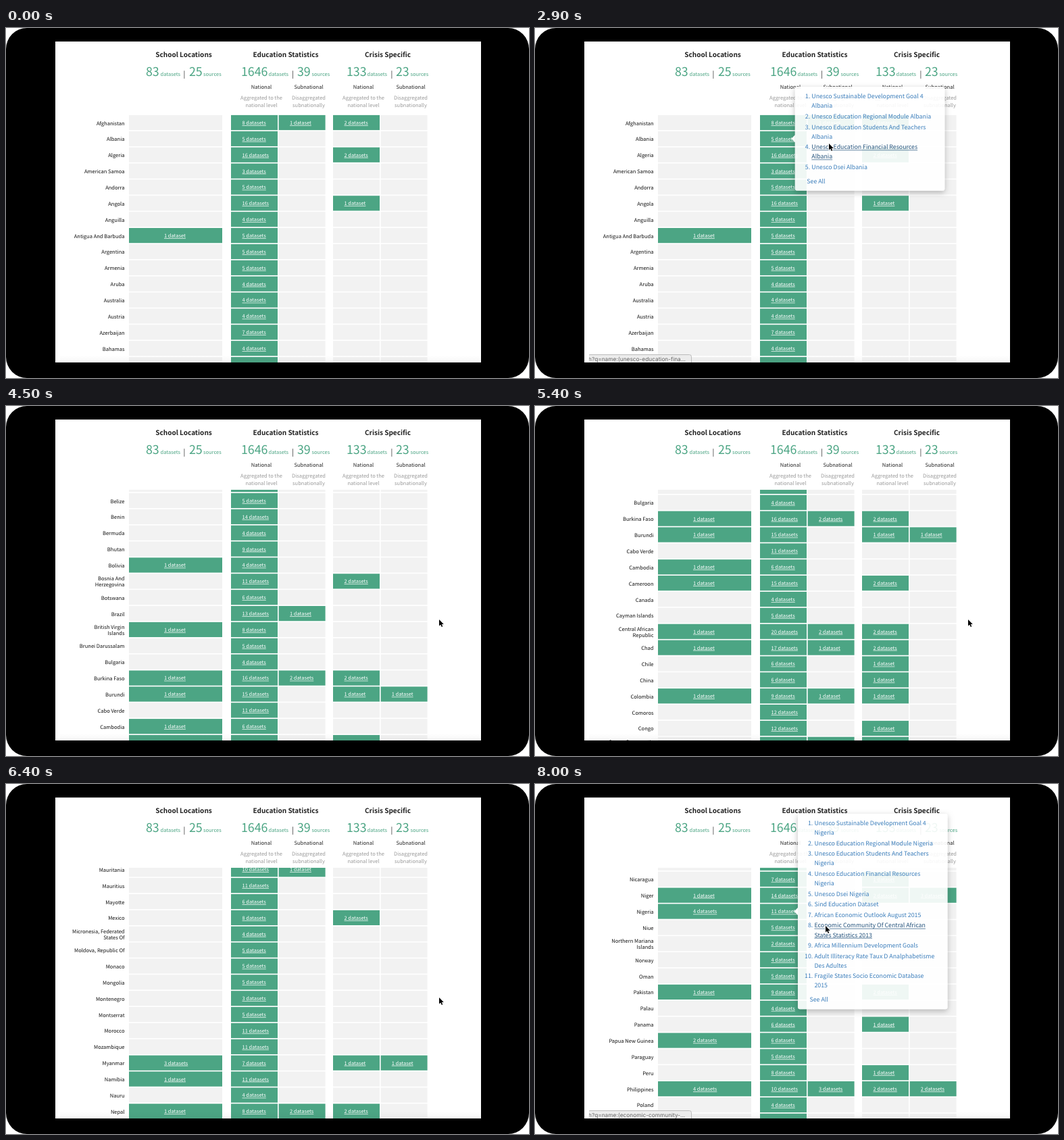
Recreate the animation shown at these times as an HTML page with a canvas. Size 774 by 518 pixels, loop 8.5 s.

```html
<!DOCTYPE html>
<html lang="en">
<head>
<meta charset="utf-8">
<title>Education datasets by country</title>
<style>
html, body { margin: 0; width: 774px; height: 518px; overflow: hidden; background: #fff; }
canvas { display: block; }
</style>
</head>
<body>
<canvas id="stage" width="774" height="518"></canvas>
<script>
const ctx = document.getElementById('stage').getContext('2d');
const SANS = '"Noto Sans CJK JP", "Noto Sans CJK SC", "Noto Sans CJK KR", "Noto Sans CJK TC", "Noto Sans CJK", "Source Sans Pro", "Open Sans", sans-serif';
const UI = 'Inter, Roboto, sans-serif';
const GREEN = '#4ca584', LINK = '#3a7dbb', LINK_HOVER = '#23527c';
const LOOP = 8500, PITCH = 23.87, FIRST = 140;

// l: locations, n/s: statistics (national, subnational), c/d: crisis (national, subnational)
const COLS = {
  l: { x: 182, w: 138, text: 234 },
  n: { x: 333, w: 69, text: 349.5 },
  s: { x: 403.6, w: 69, text: 420 },
  c: { x: 484, w: 69, text: 500.5 },
  d: { x: 554.6, w: 69, text: 570.7 }
};

const COUNTRIES = (
  'Afghanistan:n8s1c2;Albania:n5;Algeria:n16c2;American Samoa:n3;Andorra:n5;Angola:n16c1;Anguilla:n4;' +
  'Antigua And Barbuda:l1n5;Argentina:n5;Armenia:n5;Aruba:n4;Australia:n4;Austria:n4;Azerbaijan:n7;' +
  'Bahamas:n4;Bahrain:n5;Bangladesh:l6n8s6c2d1;Barbados:l1n5;Belarus:n5;Belgium:n4;Belize:n5;Benin:n14;' +
  'Bermuda:n4;Bhutan;Bolivia;Bosnia And/Herzegovina;Botswana;Brazil;British Virgin/Islands;' +
  'Brunei Darussalam:n5;Bulgaria:n4;Burkina Faso:l1n16s2c2;Burundi:l1n15c1d1;Cabo Verde:n11;' +
  'Cambodia:l1n6;Cameroon:l1n15c2;Canada:n4;Cayman Islands:n5;Central African/Republic:l1n20s2c2;' +
  'Chad:l1n17s1c2;Chile:n6c1;China:n6c1;Colombia:l1n9s1c1;Comoros:n12;Congo:n12c1;' +
  'Congo, Democratic/Republic Of;Cook Islands;Costa Rica;Côte D\'Ivoire;Croatia;Cuba;Curaçao;Cyprus;' +
  'Czech Republic;Denmark;Djibouti;Dominica;Dominican/Republic;Ecuador;Egypt;El Salvador;' +
  'Equatorial Guinea;Eritrea;Estonia;Ethiopia;Fiji;Finland;France;French Polynesia;Gabon;Gambia;' +
  'Georgia;Germany;Ghana;Gibraltar;Greece;Grenada;Guam;Guatemala;Guinea;Guinea-Bissau;Guyana;Haiti;' +
  'Honduras;Hong Kong;Hungary;Iceland;India;Indonesia;Iran;Iraq;Ireland;Israel;Italy;Jamaica;Japan;' +
  'Jordan;Kazakhstan;Kenya;Kiribati;Kuwait;Kyrgyzstan;Latvia;Lebanon;Lesotho;Liberia;Libya;' +
  'Liechtenstein;Lithuania;Luxembourg;Macao;Madagascar;Malawi;Malaysia;Maldives;Mali;Malta;' +
  'Marshall Islands;Mauritania:n10s1;Mauritius:n11;Mayotte:n6;Mexico:n8c2;' +
  'Micronesia, Federated/States Of:n4;Moldova, Republic Of:n5;Monaco:n5;Mongolia:n5;Montenegro:n3;' +
  'Montserrat:n5;Morocco:n11;Mozambique:n11;Myanmar:l3n7c1d1;Namibia:l1n11;Nauru:n4;Nepal:l1n8s2c2;' +
  'Netherlands;New Caledonia;New Zealand:n4;Nicaragua:n7c1;Niger:l1n14c2d3;Nigeria:l4n11;Niue:n5;' +
  'Northern Mariana/Islands:n2;Norway:n4;Oman:n5;Pakistan:l1n9c2;Palau:n4;Panama:n6c1;' +
  'Papua New Guinea:l2n6;Paraguay:n5;Peru:n8c1;Philippines:l4n10s3c2d2;Poland:n4;Portugal:n5;Qatar'
).split(';').map(parseRow);

function parseRow(entry, i) {
  const [name, code] = entry.split(':');
  const cells = {};
  if (code) {
    for (const [, key, n] of code.matchAll(/([a-z])(\d+)/g)) cells[key] = +n;
  } else {
    cells.n = 4 + i * 7 % 12;
    if (i % 4 === 0) cells.l = 1;
    if (i % 5 === 0) cells.c = 1 + i % 2;
    if (i % 9 === 0) cells.s = 1;
  }
  return { lines: name.split('/'), cells };
}

const rowOf = name => COUNTRIES.findIndex(r => r.lines[0] === name);

const unesco = place => [
  ['Unesco Sustainable Development Goal 4', place],
  place === 'Afghanistan' ? ['Unesco Education Regional Module', place]
    : ['Unesco Education Regional Module ' + place],
  ['Unesco Education Students And Teachers', place],
  ['Unesco Education Financial Resources', place],
  ['Unesco Dsei ' + place]
];

const LISTS = {
  Afghanistan: [...unesco('Afghanistan'), ['Education Indicators 2013'], ['School Enrolment By District'],
    ['Literacy Rate By Province']],
  Albania: unesco('Albania'),
  Nigeria: [...unesco('Nigeria'), ['Sind Education Dataset'], ['African Economic Outlook August 2015'],
    ['Economic Community Of Central African', 'States Statistics 2013'], ['Africa Millennium Development Goals'],
    ['Adult Illiteracy Rate Taux D Analphabetisme', 'Des Adultes'],
    ['Fragile States Socio Economic Database', '2015']]
};

// [time, rows scrolled]
const SCROLL = [[3400, 0], [3900, 6.745], [4500, 20], [5000, 23], [5400, rowOf('Bulgaria') - 0.117],
  [6400, rowOf('Mauritania') + 0.574], [6600, rowOf('Nicaragua') - 0.034]];
// [time, x, y]
const POINTER = [[200, 366, 141], [400, 366, 141], [900, 365, 163], [1400, 428, 103], [1900, 432, 129],
  [2400, 434, 146], [2900, 435, 171], [3400, 664, 270], [3900, 668, 289], [4500, 641, 316],
  [6600, 641, 316], [6800, 368, 187], [7000, 420, 176], [7500, 428, 191], [8000, 430, 210]];
const POPUPS = [[200, 'Afghanistan'], [900, 'Albania'], [3400, null], [6800, 'Nigeria']];
const HOVERS = [[1400, 0], [1900, 1], [2400, 2], [2900, 3], [3400, null], [7000, 5], [7500, 6], [8000, 7]];
// [start, length of each step]
const STEPS = [[0, 200], [400, 500], [3900, 200], [4500, 500], [5000, 200], [7000, 500]];

const latest = (keys, t) => keys.filter(k => k[0] <= t).pop() || [0, null];

function snap(t) {
  const [start, size] = latest(STEPS, t);
  return start + Math.floor((t - start) / size) * size;
}

function tween(keys, t, col) {
  const a = latest(keys, t), b = keys.find(k => k[0] > t);
  if (a[1] === null) return b[col];
  if (!b) return a[col];
  return a[col] + (b[col] - a[col]) * (t - a[0]) / (b[0] - a[0]);
}

function font(size, weight = 400, family = SANS) {
  ctx.font = `${weight} ${size}px ${family}`;
}

function write(str, x, y, color, align = 'left') {
  ctx.fillStyle = color;
  ctx.textAlign = align;
  ctx.fillText(str, x, y);
}

function underline(str, x, y, color) {
  ctx.fillStyle = color;
  ctx.fillRect(x, y, ctx.measureText(str).width, 0.7);
}

function box(x, y, w, h, r) {
  ctx.beginPath();
  ctx.roundRect(x, y, w, h, r);
}

const linkText = n => n + (n === 1 ? ' dataset' : ' datasets');

function drawHeader() {
  ctx.fillStyle = '#fff';
  ctx.fillRect(73, 20, 630, 104);
  const groups = [
    ['School Locations', 263, [83, 207, 228.5, 264, 25, 271, 292]],
    ['Education Statistics', 414, [1646, 348, 388.5, 424.5, 39, 431, 452.5]],
    ['Crisis Specific', 565, [133, 504, 534.5, 571, 23, 577, 598.5]]
  ];
  for (const [title, cx, [sets, x1, x2, bar, sources, x3, x4]] of groups) {
    font(10, 700);
    write(title, cx, 42.5, '#222', 'center');
    font(17.8);
    write(sets, x1, 71, GREEN);
    write(sources, x3, 71, GREEN);
    font(7.5);
    write('datasets', x2, 71, GREEN);
    write('sources', x4, 71, GREEN);
    font(10.5);
    write('|', bar, 71.5, '#222', 'center');
  }
  font(7.6);
  for (const x of [378, 529]) {
    write('National', x, 90.3, '#222', 'center');
    write('Subnational', x + 70, 90.3, '#222', 'center');
  }
  font(7.5);
  for (const x of [378, 529]) {
    write('Aggregated to the', x, 105.7, '#999', 'center');
    write('national level', x, 117.4, '#999', 'center');
    write('Disaggregated', x + 70, 105.7, '#999', 'center');
    write('subnationally', x + 70, 117.4, '#999', 'center');
  }
}

function drawRow(row, cy) {
  font(7.55);
  row.lines.forEach((line, i) => {
    const shift = (i - (row.lines.length - 1) / 2) * 9;
    write(line, 175.5, cy + 3.5 + shift, '#111', 'right');
  });
  font(7.5);
  for (const key in COLS) {
    const col = COLS[key], n = row.cells[key];
    ctx.fillStyle = n ? GREEN : '#f2f2f2';
    ctx.fillRect(col.x, cy - 11.1, col.w, 22.2);
    if (!n) continue;
    write(linkText(n), col.text, cy + 2.9, '#fff');
    underline(linkText(n), col.text, cy + 4, '#fff');
  }
}

function drawTable(scroll) {
  COUNTRIES.forEach((row, i) => {
    const cy = FIRST + (i - scroll) * PITCH;
    if (cy > 100 && cy < 510) drawRow(row, cy);
  });
  const shade = ctx.createLinearGradient(0, 484, 0, 495);
  shade.addColorStop(0, 'rgba(0,0,0,0)');
  shade.addColorStop(1, 'rgba(0,0,0,0.03)');
  ctx.fillStyle = shade;
  ctx.fillRect(80, 484, 623, 11);
}

function drawPopup(name, scroll, hover, alpha) {
  const items = LISTS[name], index = rowOf(name);
  const cy = FIRST + (index - scroll) * PITCH;
  const LINE = 14.05, GAP = 1.55;
  font(7.5);
  const left = COLS.n.text + ctx.measureText(linkText(COUNTRIES[index].cells.n)).width;
  const lineCount = items.flat().length;
  const h = 49 + (lineCount - 1) * LINE + (items.length - 1) * GAP;
  const top = cy - h / 2, w = 221.5;

  ctx.save();
  ctx.globalAlpha = alpha;

  // shadow only outside the panel, which is slightly see-through
  ctx.save();
  ctx.beginPath();
  ctx.rect(0, 0, 774, 518);
  ctx.roundRect(left, top, w, h, 3);
  ctx.clip('evenodd');
  ctx.shadowColor = 'rgba(0,0,0,0.25)';
  ctx.shadowBlur = 9;
  ctx.shadowOffsetY = 3;
  ctx.fillStyle = '#fff';
  box(left, top, w, h, 3);
  ctx.fill();
  ctx.restore();

  ctx.fillStyle = 'rgba(255,255,255,0.91)';
  box(left, top, w, h, 3);
  ctx.fill();
  ctx.fillStyle = '#fff';
  ctx.beginPath();
  ctx.moveTo(left, cy - 5.5);
  ctx.lineTo(left - 5.5, cy);
  ctx.lineTo(left, cy + 5.5);
  ctx.fill();

  font(8.8);
  let y = top + 17.2;
  items.forEach((lines, i) => {
    write(i + 1 + '.', left + 22.3, y, LINK, 'right');
    for (const line of lines) {
      const color = i === hover ? LINK_HOVER : LINK;
      write(line, left + 24.5, y, color);
      if (i === hover) underline(line, left + 24.5, y + 1.3, color);
      y += LINE;
    }
    y += GAP;
  });
  write('See All', left + 17.5, y - GAP - LINE + 21, LINK);
  ctx.restore();
}

function drawStatus(title) {
  font(8.3, 400, UI);
  const full = title.join(' ').toLowerCase().replace(/ /g, '-');
  let slug = full;
  while (ctx.measureText(slug).width > 93) slug = slug.slice(0, -1);
  if (slug !== full) slug += '...';
  ctx.save();
  ctx.beginPath();
  ctx.rect(80, 480, 160, 15);
  ctx.clip();
  box(78, 483.5, 153.5, 16, 3);
  ctx.fillStyle = '#ececec';
  ctx.fill();
  ctx.strokeStyle = '#bbb';
  ctx.lineWidth = 1;
  ctx.stroke();
  write('h?q=name:(' + slug, 79, 493, '#666');
  ctx.restore();
}

function drawPointer(x, y) {
  const shape = [[0, 0], [0, 9.6], [2.2, 7.6], [3.8, 11], [5.3, 10.3], [3.8, 7], [6.8, 6.9]];
  ctx.beginPath();
  for (const [dx, dy] of shape) ctx.lineTo(x + dx, y + dy);
  ctx.closePath();
  ctx.lineJoin = 'round';
  ctx.lineWidth = 1.6;
  ctx.strokeStyle = '#fff';
  ctx.stroke();
  ctx.fillStyle = '#000';
  ctx.fill();
}

function draw(t) {
  const scroll = t < 3400 ? 0 : tween(SCROLL, t, 1);
  const popup = latest(POPUPS, t)[1], hover = latest(HOVERS, t)[1];

  ctx.fillStyle = '#fff';
  ctx.fillRect(0, 0, 774, 518);
  ctx.fillStyle = '#000';
  box(0, 0, 774, 518, 31);
  ctx.fill();

  ctx.save();
  ctx.beginPath();
  ctx.rect(73, 20, 630, 475);
  ctx.clip();
  ctx.fillStyle = '#fff';
  ctx.fillRect(73, 20, 630, 475);
  drawTable(scroll);
  drawHeader();
  if (popup) drawPopup(popup, scroll, hover, t < 400 ? 0.5 : 1);
  if (hover !== null) drawStatus(LISTS[popup][hover]);
  if (t >= 200) drawPointer(tween(POINTER, t, 1), tween(POINTER, t, 2));
  ctx.restore();
}

ctx.textRendering = 'geometricPrecision';
const begin = performance.now();
function tick() {
  draw(snap((performance.now() - begin) % LOOP));
  requestAnimationFrame(tick);
}
tick();
</script>
</body>
</html>
```
